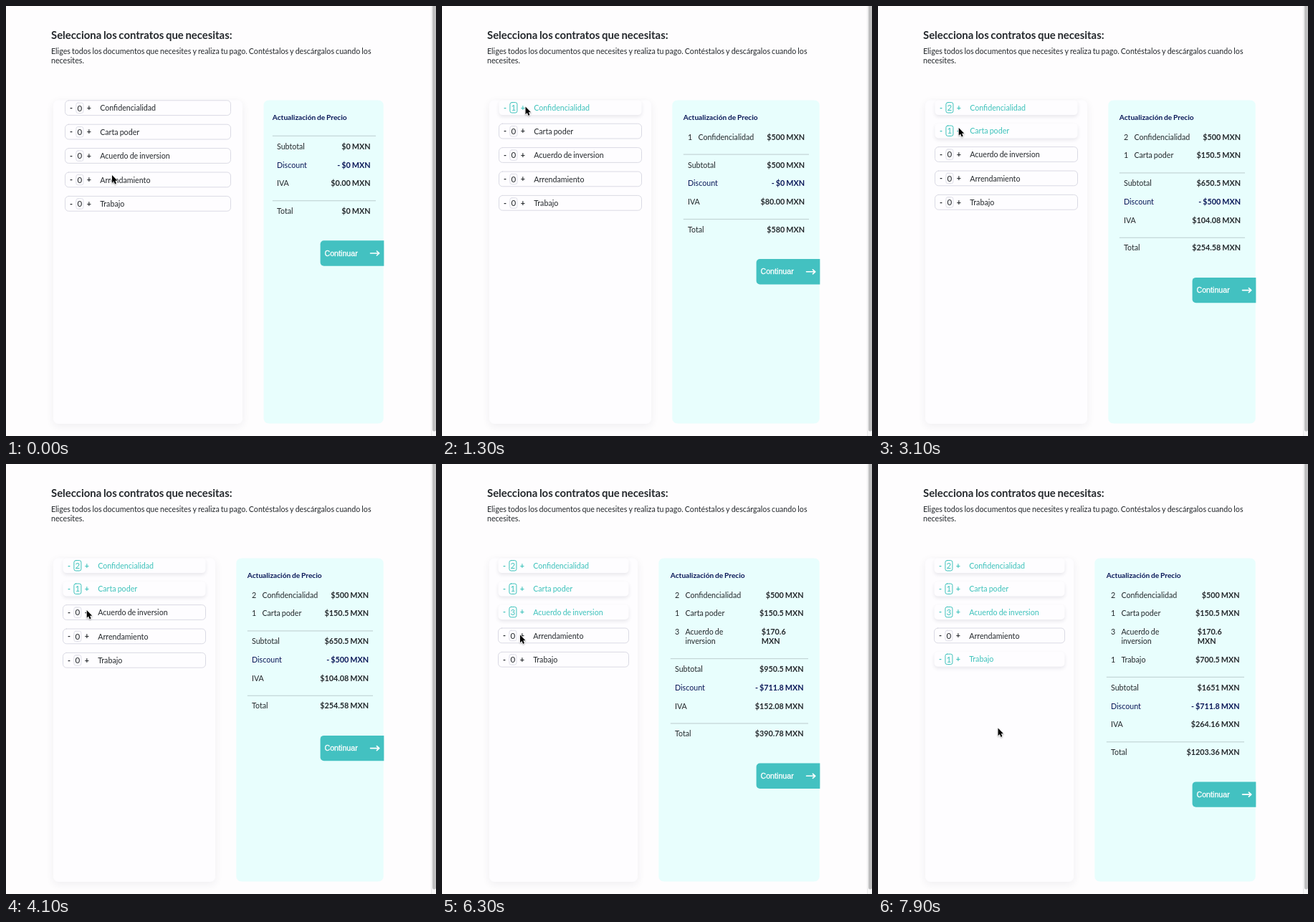
Write an HTML page with a canvas that moves like this. It is 600x600 px and loops after 8 s.

```html
<!DOCTYPE html>
<html lang="es">
<head>
<meta charset="utf-8">
<title>Contratos</title>
<style>
html, body { margin: 0; width: 100%; height: 100%; overflow: hidden; background: #fefdfe; }
canvas { display: block; width: 600px; height: 600px; }
</style>
</head>
<body>
<canvas id="stage"></canvas>
<script>
const LOOP = 8000, STEP = 100;
const INK = '#24282c', NAVY = '#0a1758', TEAL = '#3dc2bb', BUTTON = '#43c1c1';
const LATO = 'Lato, sans-serif', ARIAL = '"Liberation Sans", Arial, sans-serif';
const SIZE = 10.67, BOLD_SIZE = 10.8, LINE = 12.9, ROW = 25.8;

const canvas = document.getElementById('stage');
const ctx = canvas.getContext('2d');
const dpr = window.devicePixelRatio || 1;
canvas.width = canvas.height = 600 * dpr;

const items = [
  { name: 'Confidencialidad', price: '$500' },
  { name: 'Carta poder', price: '$150.5' },
  { name: 'Acuerdo de inversion', price: '$170.6', lines: ['Acuerdo de', 'inversion'] },
  { name: 'Arrendamiento', price: '$0' },
  { name: 'Trabajo', price: '$700.5' }
];

// Column geometry: card edge, list rows, price panel
const layouts = [
  { card: 330, row: [82.5, 313.5], panel: 359.5, rule: [371.8, 516], text: 378, right: 508.5 },
  { card: 292, row: [79.5, 278.5], panel: 321.3, rule: [336.8, 512], text: 343, right: 506 },
  { card: 273, row: [78.5, 260.5], panel: 302.3, rule: [318.8, 511], text: 325, right: 504.5 }
];

// sums: subtotal, discount, tax, total
const states = [
  { at: 0, layout: 0, qty: [0, 0, 0, 0, 0], sums: ['0', '0', '0.00', '0'] },
  { at: 1300, layout: 1, qty: [1, 0, 0, 0, 0], sums: ['500', '0', '80.00', '580'] },
  { at: 2200, layout: 1, qty: [2, 0, 0, 0, 0], sums: ['500', '500', '80.00', '80'] },
  { at: 2900, layout: 1, qty: [2, 1, 0, 0, 0], sums: ['650.5', '500', '104.08', '254.58'] },
  { at: 4300, layout: 2, qty: [2, 1, 1, 0, 0], sums: ['821.1', '500', '131.38', '452.48'] },
  { at: 4900, layout: 2, qty: [2, 1, 2, 0, 0], sums: ['991.7', '500', '158.67', '650.37'] },
  { at: 5700, layout: 2, qty: [2, 1, 3, 0, 0], sums: ['950.5', '711.8', '152.08', '390.78'] },
  { at: 7100, layout: 2, qty: [2, 1, 3, 0, 1], sums: ['1651', '711.8', '264.16', '1203.36'] }
];

// Pointer path: time, x, y
const path = [
  [0, 148, 236], [100, 148, 236], [200, 147, 235], [300, 147, 235], [1200, 116.5, 140.5],
  [2200, 116.5, 140.5], [2500, 112.7, 170], [3400, 112.7, 170], [3700, 112.7, 204],
  [5700, 112.7, 204], [6200, 109, 238.5], [6500, 109, 238.5], [6900, 110, 270],
  [7400, 110, 270], [7900, 167.5, 368.5], [8000, 167.5, 368.5]
];

function text(str, x, y, { color = INK, weight = 400, size = SIZE, align = 'left', font = LATO, spread = 0 } = {}) {
  ctx.font = `${weight} ${size}px ${font}`;
  ctx.wordSpacing = `${-.065 * size}px`;
  ctx.textAlign = align;
  ctx.fillStyle = color;
  ctx.fillText(str, x, y);
  if (spread) {
    ctx.strokeStyle = color;
    ctx.lineWidth = spread;
    ctx.strokeText(str, x, y);
  }
}

function box(x, y, w, h, r, { fill, stroke, shadow } = {}) {
  ctx.save();
  ctx.beginPath();
  ctx.roundRect(x, y, w, h, r);
  if (shadow) {
    ctx.shadowColor = shadow.color;
    ctx.shadowBlur = shadow.blur * dpr;
    ctx.shadowOffsetY = shadow.dy * dpr;
  }
  if (fill) { ctx.fillStyle = fill; ctx.fill(); }
  if (stroke) { ctx.strokeStyle = stroke; ctx.lineWidth = 1; ctx.stroke(); }
  ctx.restore();
}

function drawPage() {
  ctx.fillStyle = '#fefdfe';
  ctx.fillRect(0, 0, 600, 600);
  text('Selecciona los contratos que necesitas:', 63, 46.3, { weight: 700, size: 14.9 });
  text('Eliges todos los documentos que necesites y realiza tu pago. Contéstalos y descárgalos cuando los', 63, 66.5);
  text('necesites.', 63, 80);
  ctx.fillStyle = '#f7f7f8';
  ctx.fillRect(593, 0, 7, 600);
  ctx.fillStyle = '#e9e9ea';
  ctx.fillRect(593, 0, 1, 600);
  box(595, -5, 5, 598.5, 2.5, { fill: '#bfbfc0' });
}

function drawList({ card, row: [left, right] }, qty) {
  box(66, 131.5, card - 66, 451.5, 7, {
    fill: '#fefdff', shadow: { color: 'rgba(40,40,70,.07)', blur: 12, dy: 3 }
  });
  let y = 131.5;
  items.forEach(({ name }, i) => {
    const on = qty[i] > 0;
    const h = on ? 20.6 : 21.6;
    const color = on ? TEAL : INK;
    const base = y + h / 2 + 4;
    if (on) {
      box(left, y, right - left, h, 5, {
        fill: '#fefdff', shadow: { color: 'rgba(40,40,70,.10)', blur: 5, dy: 2.5 }
      });
    } else {
      box(left, y + .3, right - left, h - .8, 5, { fill: '#fefdff', stroke: '#dadae4' });
    }
    box(left + 15.4, y + h / 2 - 7.2, 10, 14.4, 2.5, { stroke: on ? TEAL : '#dedee8' });
    const sign = { color, weight: 700, align: 'center' };
    text('-', left + 8.4, base - .3, sign);
    text('+', left + 33.4, base - .3, sign);
    text(qty[i], left + 20.4, base + .2, { color, size: 11.5, align: 'center' });
    text(name, left + 48.7, base, { color });
    y += h + 11.8;
  });
}

function drawButton(y) {
  box(438.6, y - .4, 88.8, 35.4, [5, 0, 0, 5], { fill: BUTTON });
  const mid = y + 17.3;
  text('Continuar', 444.5, mid + 3.5, { color: '#fff', font: ARIAL, spread: .3 });
  ctx.strokeStyle = '#fff';
  ctx.lineWidth = 1.6;
  ctx.lineCap = ctx.lineJoin = 'round';
  ctx.beginPath();
  ctx.moveTo(508.5, mid);
  ctx.lineTo(520.5, mid);
  ctx.moveTo(517.4, mid - 3);
  ctx.lineTo(520.8, mid);
  ctx.lineTo(517.4, mid + 3);
  ctx.stroke();
}

function drawPanel({ panel, rule, text: x, right }, qty, [subtotal, discount, tax, total]) {
  box(panel, 131.5, 526.7 - panel, 451, 7, { fill: '#e8fefd' });
  text('Actualización de Precio', rule[0], 159, { color: NAVY, weight: 700, size: 10.17 });

  const line = y => {
    ctx.fillStyle = '#c3d5d6';
    ctx.fillRect(rule[0], y - .6, rule[1] - rule[0], 1.2);
  };
  const bold = { weight: 700, size: BOLD_SIZE };
  const amount = (str, y, color) => text(`${str} MXN`, right, y, { ...bold, color, align: 'right' });
  const sum = (label, str, y, color) => {
    text(label, x, y, { color });
    amount(str, y, color);
  };

  let y = 186.5;
  items.forEach(({ name, price, lines }, i) => {
    if (!qty[i]) return;
    text(qty[i], x, y);
    if (lines) {
      lines.forEach((part, n) => {
        text(part, x + 14.4, y + n * LINE);
        text(n ? 'MXN' : price, right - 58.7, y + n * LINE, bold);
      });
      y += LINE;
    } else {
      text(name, x + 14.4, y);
      amount(price, y);
    }
    y += ROW;
  });

  line(y - 5.2);
  sum('Subtotal', '$' + subtotal, y + 13.2);
  sum('Discount', '- $' + discount, y + 39, NAVY);
  sum('IVA', '$' + tax, y + 64.8);
  line(y + 85.2);
  sum('Total', '$' + total, y + 103.3);
  drawButton(y + 141.2);
}

function pointerAt(t) {
  const i = path.findIndex(p => p[0] > t);
  const [t0, x0, y0] = path[i - 1];
  const [t1, x1, y1] = path[i];
  const u = (t - t0) / (t1 - t0);
  const k = u * u * (3 - 2 * u);
  return [x0 + (x1 - x0) * k, y0 + (y1 - y0) * k];
}

function drawPointer([x, y]) {
  const arrow = new Path2D('M0 0V10.8L2.4 8.5L4.1 12.4L5.9 11.6L4.3 7.8H7.5Z');
  ctx.save();
  ctx.translate(x, y);
  ctx.shadowColor = 'rgba(0,0,0,.3)';
  ctx.shadowBlur = 2 * dpr;
  ctx.shadowOffsetY = dpr;
  ctx.strokeStyle = '#fff';
  ctx.lineWidth = 1.4;
  ctx.lineJoin = 'round';
  ctx.stroke(arrow);
  ctx.shadowColor = 'transparent';
  ctx.fillStyle = '#000';
  ctx.fill(arrow);
  ctx.restore();
}

function draw(now) {
  const t = Math.floor((now % LOOP) / STEP) * STEP;
  const { layout, qty, sums } = states.filter(s => s.at <= t).pop();
  ctx.setTransform(dpr, 0, 0, dpr, 0, 0);
  drawPage();
  drawList(layouts[layout], qty);
  drawPanel(layouts[layout], qty, sums);
  drawPointer(pointerAt(t));
}

const start = performance.now();
function tick() {
  draw(performance.now() - start);
  requestAnimationFrame(tick);
}
tick();
</script>
</body>
</html>
```
